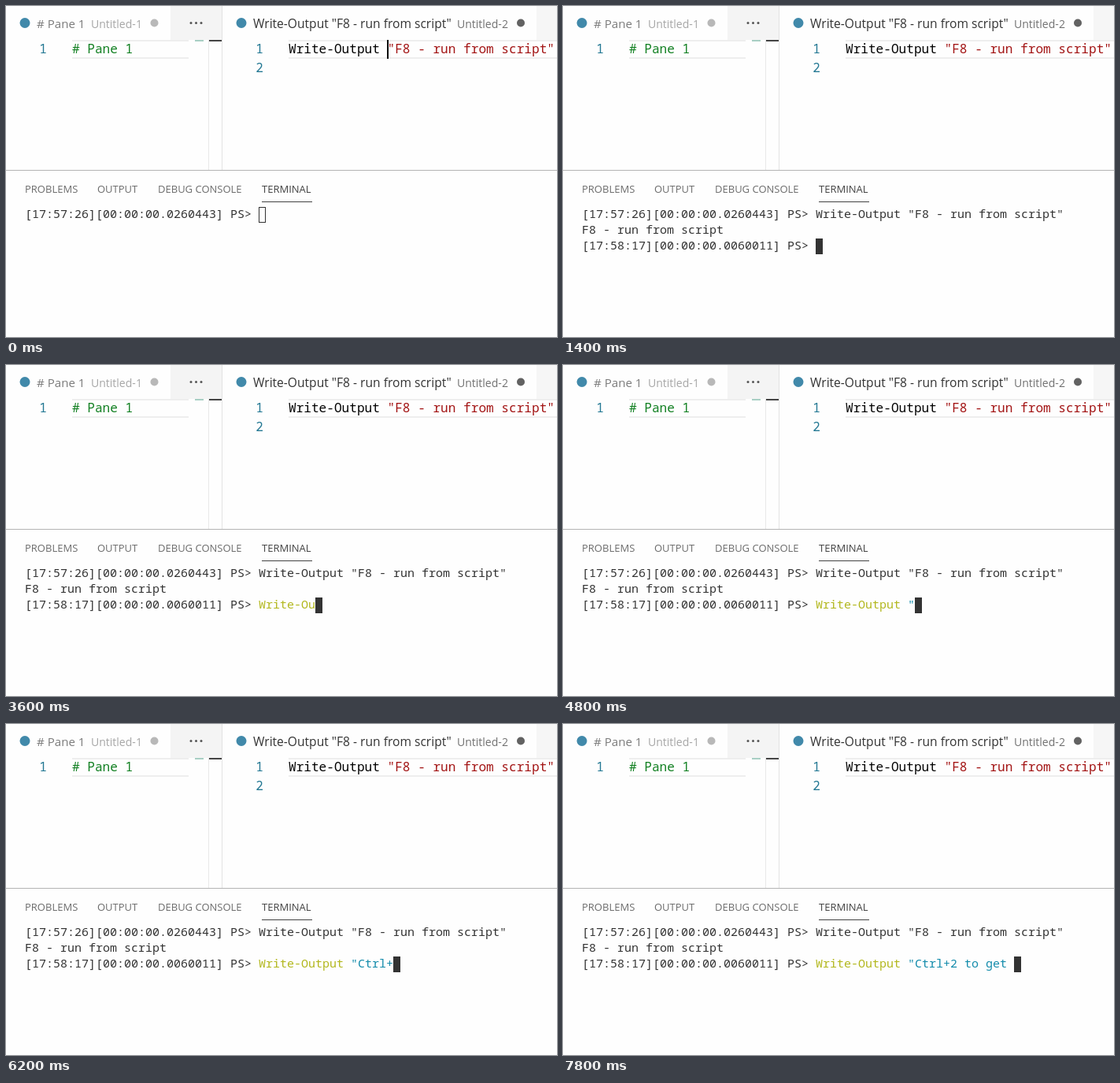
An HTML page for the animation above (8 s loop, 700 by 420 pixels).

```html
<!DOCTYPE html>
<html lang="en">
<head>
<meta charset="utf-8">
<title>Editor and terminal</title>
<style>
html, body { margin: 0; width: 100%; height: 100%; overflow: hidden; background: #fefefe; }
svg { display: block; width: 700px; height: 420px; }
text { white-space: pre; }
.ui { font-family: "Open Sans", "Noto Sans", sans-serif; font-size: 15.6px; fill: #333; }
.ui .note { font-size: 14.05px; fill: #717171; }
.ui.dim { font-size: 15.1px; fill: #7b7b7b; }
.ui.dim .note { fill: #a6a6a6; }
.panel { font-family: "Open Sans", "Noto Sans", sans-serif; font-size: 13px; fill: #6c6c6c; }
.code, .term { font-family: "Noto Sans Mono", "DejaVu Sans Mono", monospace; }
.code { font-size: 16.1px; fill: #000; }
.term { font-size: 15px; fill: #333; }
.num { fill: #237893; text-anchor: middle; }
.comment { fill: #128022; }
.str { fill: #a31515; }
.cmd { fill: #b2b71c; }
.arg { fill: #128bab; }
</style>
</head>
<body>
<svg viewBox="0 0 700 420">
  <rect width="700" height="420" fill="#fefefe"/>

  <!-- tab strips -->
  <rect x="209" width="65" height="43" fill="#f4f4f4"/>
  <rect x="674" width="26" height="43" fill="#f6f6f6"/>
  <circle cx="24" cy="21.5" r="6.5" fill="#4189aa"/>
  <circle cx="299" cy="21.5" r="6.5" fill="#4189aa"/>
  <text class="ui dim" x="39" y="28"># Pane 1</text>
  <text class="ui dim" x="108" y="28"><tspan class="note">Untitled-1</tspan></text>
  <circle cx="188.5" cy="21.5" r="5" fill="#b8b8b8"/>
  <g fill="#555">
    <circle cx="235" cy="21.5" r="1.5"/>
    <circle cx="241.5" cy="21.5" r="1.5"/>
    <circle cx="248" cy="21.5" r="1.5"/>
  </g>
  <text class="ui" x="314" y="28">Write-Output "F8 - run from script"</text>
  <text class="ui" x="573" y="28"><tspan class="note">Untitled-2</tspan></text>
  <circle cx="654" cy="21.5" r="5" fill="#626262"/>

  <!-- editors -->
  <g fill="#eee">
    <rect x="84" y="43" width="148" height="2"/>
    <rect x="84" y="65" width="148" height="2"/>
    <rect x="359" y="43" width="341" height="2"/>
    <rect x="359" y="65" width="341" height="2"/>
  </g>
  <rect x="240" y="43" width="11" height="2" fill="#a9cfc4"/>
  <rect x="257" y="43" width="1" height="165" fill="#e9e9e9"/>
  <rect x="274" width="1" height="208" fill="#e2e2e2"/>
  <rect x="258" y="43" width="16" height="2" fill="#444"/>
  <text class="code num" x="47" y="60">1</text>
  <text class="code comment" x="84" y="60"># Pane 1</text>
  <text class="code num" x="322" y="60">1</text>
  <text class="code num" x="322" y="84">2</text>
  <text class="code" x="359" y="60">Write-Output <tspan class="str">"F8 - run from script"</tspan></text>
  <rect id="caret" x="484" y="43" width="2" height="24"/>

  <!-- panel -->
  <rect y="208" width="700" height="1" fill="#b4b4b4"/>
  <g class="panel">
    <text x="24" y="237">PROBLEMS</text>
    <text x="116" y="237">OUTPUT</text>
    <text x="193" y="237">DEBUG CONSOLE</text>
    <text x="325" y="237" fill="#424242" style="fill:#424242">TERMINAL</text>
  </g>
  <rect x="325" y="248" width="64" height="1" fill="#424242"/>
  <g class="term">
    <text x="24" y="269">[17:57:26][00:00:00.0260443] PS&gt; </text>
    <text id="run" x="321" y="269">Write-Output "F8 - run from script"</text>
    <g id="result">
      <text x="24" y="289">F8 - run from script</text>
      <text x="24" y="309">[17:58:17][00:00:00.0060011] PS&gt; </text>
    </g>
    <text x="321" y="309"><tspan id="cmd" class="cmd"></tspan></text>
    <text x="438" y="309"><tspan id="arg" class="arg"></tspan></text>
  </g>
  <rect id="cursor" stroke="#333"/>
</svg>
<script>
const LOOP = 8000, CELL = 9, ROW = 20, LEFT = 321, TOP = 255;
const LINE = 'Write-Output "Ctrl+2 to get ';
const SPLIT = 13;   // command and its space
const FOCUS = 800, RUN = 1200, DONE = 1400;

// bursts of typing: start time, then letters typed after each 200 ms tick
const BURSTS = [
  [2600, [2, 3, 4, 5, 6, 8, 9, 10, 12, 13]],
  [4800, [14]],
  [5200, [15, 16, 17, 18]],
  [6200, [19]],
  [6600, [20, 21, 22, 24, 25, 27, 28]]
];

const el = id => document.getElementById(id);
const [caret, run, result, cmd, arg, cursor] =
  ['caret', 'run', 'result', 'cmd', 'arg', 'cursor'].map(el);

function show(node, on) {
  node.setAttribute('visibility', on ? 'visible' : 'hidden');
}

function set(node, attrs) {
  for (const k in attrs) node.setAttribute(k, attrs[k]);
}

function typed(t) {
  let n = 0;
  for (const [start, counts] of BURSTS) {
    if (t < start) break;
    const i = Math.floor((t - start) / 200);
    n = counts[Math.min(i, counts.length - 1)];
  }
  return n;
}

function render(t) {
  const n = typed(t);
  const ran = t >= RUN, done = t >= DONE, focused = t >= FOCUS;
  show(caret, t < 400);
  show(run, ran);
  show(result, done);
  cmd.textContent = LINE.slice(0, Math.min(n, SPLIT));
  arg.textContent = LINE.slice(SPLIT, Math.max(n, SPLIT));

  const col = done ? n : ran ? 35 : 0;
  set(cursor, {
    x: LEFT + col * CELL + 0.5,
    y: TOP + (done ? 2 * ROW : 0) + 0.5,
    width: CELL - 1,
    height: ROW - 1,
    fill: focused ? '#333' : 'none'
  });
}

let begin = null;
function tick(now) {
  if (begin === null) begin = now;
  render((now - begin) % LOOP);
  requestAnimationFrame(tick);
}
render(0);
requestAnimationFrame(tick);
</script>
</body>
</html>
```
